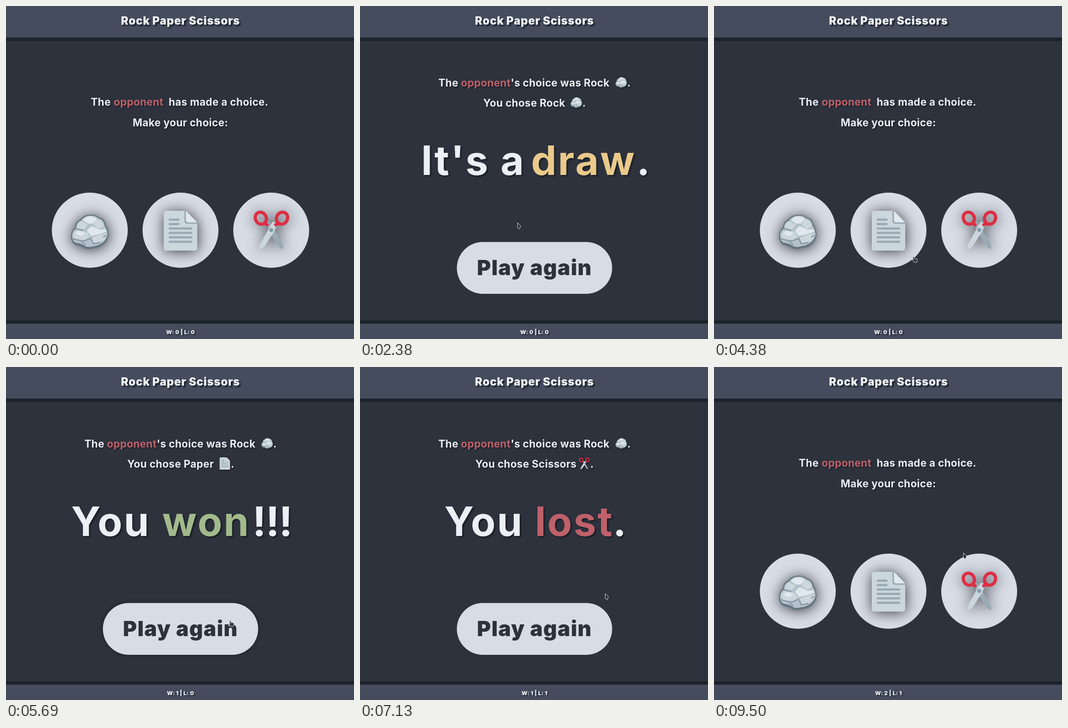
An HTML page for the animation above (9560 ms loop, 706 by 678 pixels).

```html
<!DOCTYPE html>
<html lang="en">
<head>
<meta charset="utf-8">
<title>Rock Paper Scissors</title>
<style>
html, body { margin: 0; width: 100%; height: 100%; overflow: hidden; background: #2d323d; }
svg { display: block; width: 100vw; height: 100vh; }
text { font-family: Inter, Roboto, sans-serif; fill: #eceff4; white-space: pre; }
.line { font-size: 21px; font-weight: 700; letter-spacing: .014em; }
.big { font-size: 82px; font-weight: 700; letter-spacing: .035em; }
.mark { font-size: 82px; font-weight: 700; letter-spacing: -.01em; }
.black { font-weight: 900; letter-spacing: .028em; text-anchor: middle; }
.shade { filter: drop-shadow(3px 3px 1px #1b1f27); }
.shade-s { filter: drop-shadow(2px 2px 1px #1b1f27); }
.glow { filter: drop-shadow(1px 2px 14px rgba(15, 18, 24, .8)); }
.hover { filter: drop-shadow(0 0 4px #1b1f27); }
</style>
</head>
<body>
<svg viewBox="0 0 706 678" preserveAspectRatio="none">
  <defs>
    <g id="rock">
      <path fill="#66757f" d="M-38 7Q-37-4-30-9Q-30-22-20-25Q-13-35 0-35Q12-36 18-30Q30-28 32-15Q38-6 38 8Q36 18 30 24Q20 33 8 33Q0 37-10 34Q-17 28-29 27Q-40 20-38 7Z"/>
      <path fill="#b5c1ca" d="M-36 7Q-35-3-28-7Q-28-20-18-23Q-11-33 0-33Q11-34 17-28Q28-26 30-13Q36-4 36 7Q33 16 27 21Q16 29 7 29Q-2 32-9 29Q-17 23-29 22Q-37 17-36 7Z"/>
      <path fill="#ccd6dd" d="M-34 6Q-30-4-25-5L-6 0L0 10L-12 17L-30 14ZM4 12L22 5L35 3Q32 16 25 19L8 23ZM-26-9Q-25-20-17-22L-4-15L-12-5ZM10-27Q26-25 29-12L18-5L8-14Z"/>
      <path fill="#e1e8ed" d="M-14-24Q-8-32 2-32L14-28L6-17L-3-17ZM-6-3L4-12L20-4L32-6L33 0L17 5L2 8ZM-30 3L-22-2L-10 2L-16 9Z"/>
      <path fill="none" stroke="#899aa6" stroke-width="2.5" stroke-linecap="round" stroke-linejoin="round" d="M-34 14L-18 18L-10 26M-10 18L2 13L7 24L20 22M-28-6L-14-3M28 10L33 7M-18 18L-10 18"/>
    </g>
    <g id="paper">
      <path fill="#ccd6dd" d="M-28-40.5H10L34-15V34.5Q34 40.5 28 40.5H-28Q-34 40.5-34 34.5V-34.5Q-34-40.5-28-40.5Z"/>
      <path fill="#99aab5" d="M8-40.5H11L34-17V-14H14Q8-14 8-20Z"/>
      <path fill="#e1e8ed" d="M11-40.5L34-17H16Q11-17 11-22Z"/>
      <path stroke="#99aab5" stroke-width="4.4" stroke-linecap="round" d="M-22-22.5H-4M-22-13.5H-4M-22-4.5H22M-22 4.5H22M-22 13.5H22M-22 22.5H22"/>
    </g>
    <g id="scissors">
      <path fill="#99aab5" d="M-10-14L-3-17L23 28Q26 35 24 39Q17 37 13 31L-4 3Z"/>
      <path fill="#ccd6dd" d="M10-14L3-17L-21 26Q-25 34-23 39Q-16 37-12 31L5 5L12-9Z"/>
      <g fill="none" stroke="#dd2e44" stroke-width="6.5">
        <ellipse cx="-21" cy="-24" rx="11" ry="12.5" transform="rotate(-28 -21 -24)"/>
        <ellipse cx="22" cy="-24" rx="11" ry="12.5" transform="rotate(28 22 -24)"/>
        <path d="M-14-14L-6-9M15-14L7-9"/>
      </g>
      <circle r="4" fill="#8899a6"/>
    </g>
  </defs>

  <rect width="706" height="678" fill="#2d323d"/>
  <path fill="#444c5e" d="M0 0H706V64.5H0ZM0 646.5H706V678H0Z"/>
  <path fill="#1d2129" d="M0 64.5H706V71H0ZM0 640H706V646.5H0Z"/>
  <text class="black shade" x="354" y="38" font-size="22.5">Rock Paper Scissors</text>
  <text class="black shade-s" id="score" x="354" y="668" font-size="11"></text>
  <g id="choose"></g>
  <g id="result">
    <g id="outcome"></g>
    <rect id="pill" x="196.5" y="480.5" width="315" height="105.5" rx="52.75" fill="#d8dce6"/>
    <text class="black" x="354" y="548" font-size="43" style="fill:#2d323d">Play again</text>
  </g>
  <g id="cursor">
    <path id="arrow" fill="#2b2f38" stroke="#d4d7dd" stroke-width="1" stroke-linejoin="round" d="M.5.5V10.5L4.5 13L7 6.5Z"/>
    <path id="hand" fill="#33373f" stroke="#dfe2e8" stroke-width=".9" stroke-linejoin="round" d="M2 .5Q3.5 0 4 1.5L4.8 4.2L9 4.6Q10.5 5 10.3 7L9.5 12H4L.5 7.5Q0 6 1.2 5.8L2.6 6.8L1.2 2Z"/>
  </g>
</svg>
<script>
const LOOP = 9560, STEP = 62.5;
const RED = '#bf616a', GREEN = '#a2ba8b', YELLOW = '#eaca8b';
const $ = id => document.getElementById(id);

const run = (x, y, str, fill, cls = 'line') =>
  `<text class="${cls}" x="${x}" y="${y}"${fill ? ` style="fill:${fill}"` : ''}>${str}</text>`;
const icon = (name, x, y, scale = 1) =>
  `<use href="#${name}" transform="translate(${x} ${y}) scale(${scale})"/>`;
const cap = s => s[0].toUpperCase() + s.slice(1);
const foeWord = `<tspan style="fill:${RED}">opponent</tspan>`;

const foeLine = { rock: [159, 530], paper: [154, 535] };
const ownLine = { rock: [250, 439], paper: [246, 444], scissors: [234, 455] };
const endings = {
  draw: [[124, "It's a"], [347, 'draw', YELLOW], [561, '.']],
  won: [[132, 'You'], [317, 'won', GREEN], [500, '!!!']],
  lost: [[171, 'You'], [355, 'lost', RED], [513, '.']]
};

const choiceLine = (y, [x, iconX], lead, pick) =>
  run(x, y, `${lead} ${cap(pick)}`) + icon(pick, iconX, y - 8.5, .31) + run(iconX + 12, y, '.');

function outcome(foe, own, end) {
  const parts = endings[end].map(([x, s, c]) => run(x, 344, s, c, /\w/.test(s) ? 'big' : 'mark'));
  return '<g class="shade-s">' +
    choiceLine(164, foeLine[foe], `The ${foeWord}'s choice was`, foe) +
    choiceLine(205, ownLine[own], 'You chose', own) +
    `</g><g class="shade">${parts.join('')}</g>`;
}

const discs = [['rock', 170, 460], ['paper', 354, 457.5], ['scissors', 538, 456]];
$('choose').innerHTML =
  `<g class="shade-s">${run(172, 203, 'The')}${run(218.5, 203, 'opponent', RED)}` +
  run(330, 203, 'has made a choice.') + run(257, 245, 'Make your choice:') + '</g>' +
  discs.map(([name, x, y]) =>
    `<ellipse cx="${x}" cy="456.5" rx="77" ry="76.5" fill="#d8dce6"/><g class="glow">${icon(name, x, y)}</g>`).join('');

// [time of click, wins, losses, opponent's pick, own pick, ending]
const scenes = [
  [0, 0, 0],
  [1375, 0, 0, 'rock', 'rock', 'draw'],
  [3250, 0, 0],
  [4625, 1, 0, 'rock', 'paper', 'won'],
  [5812, 1, 0],
  [6375, 1, 1, 'rock', 'scissors', 'lost'],
  [7562, 1, 1],
  [8187, 2, 1, 'paper', 'scissors', 'won'],
  [9312, 2, 1]
];

// [time, x, y] of the pointer tip
const path = [
  [62, 668, 190], [1000, 176, 484], [1437, 176, 480], [2000, 206, 404], [2375, 319, 441],
  [3000, 428, 508], [3312, 428, 508], [4375, 402, 510], [4687, 402, 510], [5687, 452, 516],
  [5875, 452, 516], [6000, 474, 508], [6187, 509, 455], [6687, 509, 455], [6875, 503, 444],
  [7062, 503, 444], [7125, 497, 461], [7437, 472, 508], [7625, 472, 508], [8062, 498, 470],
  [8187, 498, 470], [8312, 494.5, 472], [8875, 478, 508], [9312, 478, 508], [9500, 505.5, 378]
];

function pointer(t) {
  let i = 0;
  while (i < path.length - 2 && path[i + 1][0] <= t) i++;
  const [t0, x0, y0] = path[i], [t1, x1, y1] = path[i + 1];
  const u = Math.min(1, Math.max(0, (t - t0) / (t1 - t0)));
  const e = u * u * (3 - 2 * u);
  return [x0 + (x1 - x0) * e, y0 + (y1 - y0) * e];
}

const overDisc = (x, y) => discs.some(d => Math.hypot(x - d[1], y - 456.5) < 76.5);
const overPill = (x, y) =>
  Math.hypot(x - Math.min(458.5, Math.max(249, x)), y - 533) < 53;
const show = (id, on) => $(id).setAttribute('display', on ? 'inline' : 'none');

let shown = -1;
function setScene(i) {
  if (i === shown) return;
  shown = i;
  const [, wins, losses, foe, own, end] = scenes[i];
  $('score').textContent = `W: ${wins} | L: ${losses}`;
  show('choose', !foe);
  show('result', foe);
  if (foe) $('outcome').innerHTML = outcome(foe, own, end);
}

function draw(ms) {
  const t = Math.floor((ms % LOOP + 5) / STEP) * STEP;
  let i = scenes.length - 1;
  while (scenes[i][0] > t) i--;
  setScene(i);
  const [x, y] = pointer(t);
  const hot = scenes[i][3] ? overPill(x, y) : overDisc(x, y);
  show('cursor', t >= STEP);
  show('arrow', !hot);
  show('hand', hot);
  $('cursor').setAttribute('transform', `translate(${x} ${y})`);
  $('pill').setAttribute('class', hot ? 'hover' : '');
}

const start = performance.now();
function tick() {
  draw(performance.now() - start);
  requestAnimationFrame(tick);
}
tick();
</script>
</body>
</html>
```
